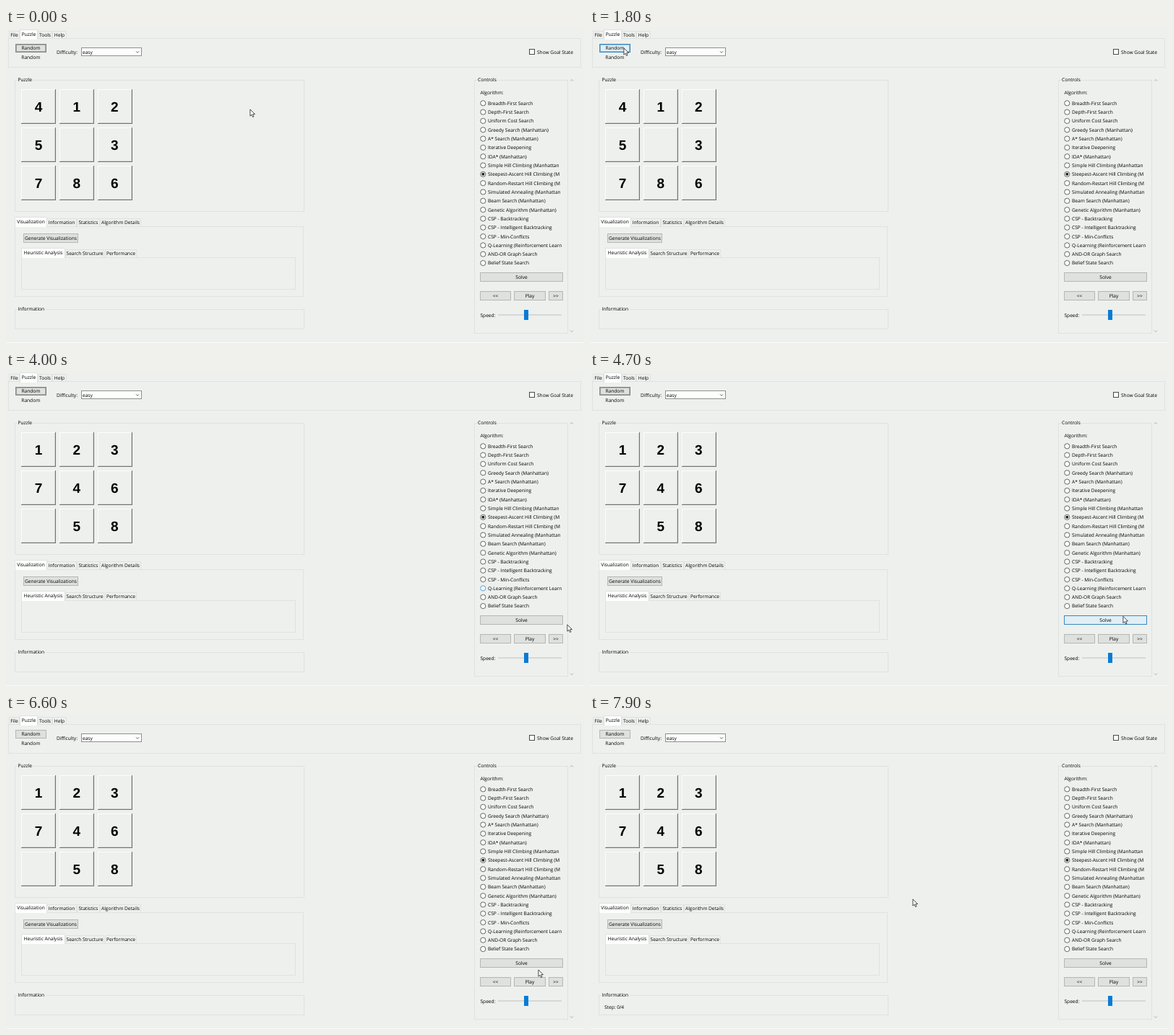
These frames come from a looping animation (800 by 437 pixels, 8000 ms). An HTML page with a canvas:

```html
<!DOCTYPE html>
<html lang="en">
<head>
<meta charset="utf-8">
<title>Sliding puzzle solver</title>
<style>
html, body { margin: 0; width: 800px; height: 437px; overflow: hidden; background: #edf0ed; }
canvas { display: block; }
</style>
</head>
<body>
<canvas id="stage" width="800" height="437"></canvas>
<script>
const ctx = document.getElementById('stage').getContext('2d');
const LOOP = 8000, STEP = 100;
const BG = '#edf0ed', LINE = '#dfe2df';
const UI = '500 6.6px "Open Sans", "Noto Sans", sans-serif';

// long labels are cut off by the panel edge
const ALGORITHMS = [
  'Breadth-First Search', 'Depth-First Search', 'Uniform Cost Search',
  'Greedy Search (Manhattan)', 'A* Search (Manhattan)', 'Iterative Deepening',
  'IDA* (Manhattan)', 'Simple Hill Climbing (Manhattan',
  'Steepest-Ascent Hill Climbing (M', 'Random-Restart Hill Climbing (M',
  'Simulated Annealing (Manhattan', 'Beam Search (Manhattan)',
  'Genetic Algorithm (Manhattan)', 'CSP - Backtracking',
  'CSP - Intelligent Backtracking', 'CSP - Min-Conflicts',
  'Q-Learning (Reinforcement Learn', 'AND-OR Graph Search', 'Belief State Search'
];
const CHOSEN = 8, Q_LEARNING = 16;

// time, x, y of the pointer tip
const PATH = [
  [0, 338, 113], [200, 338, 113], [1000, 45, 36], [1200, 45, 36], [1600, 47, 28],
  [3100, 47, 28], [3700, 660, 301], [4000, 777, 352], [4500, 738, 341], [5000, 738, 339.5],
  [5800, 738, 339.5], [6600, 737, 355], [6800, 735, 370], [7100, 735, 370],
  [7800, 447, 257], [8000, 447, 257]
];

function pointerAt(t) {
  let i = 0;
  while (i < PATH.length - 2 && t >= PATH[i + 1][0]) i++;
  const [t0, x0, y0] = PATH[i], [t1, x1, y1] = PATH[i + 1];
  const u = (t - t0) / (t1 - t0), k = u * u * (3 - 2 * u);
  return { x: x0 + (x1 - x0) * k, y: y0 + (y1 - y0) * k };
}

const boardAt = t => t < 1900 ? '4125 3786' : t < 3000 ? '1234 5786' : '123746 58';

function rect(x, y, w, h, color) {
  ctx.fillStyle = color;
  ctx.fillRect(x, y, w, h);
}

function frame(x, y, w, h, color = LINE) {
  ctx.strokeStyle = color;
  ctx.lineWidth = 1;
  ctx.strokeRect(x + 0.5, y + 0.5, w - 1, h - 1);
}

function text(str, x, y, align = 'left') {
  ctx.font = UI;
  ctx.textAlign = align;
  ctx.textBaseline = 'alphabetic';
  ctx.fillStyle = '#000';
  ctx.fillText(str, x, y + 2.4);
}

function group(title, x, y, w, h, titleX) {
  frame(x, y, w, h);
  ctx.font = UI;
  rect(titleX - 1, y - 3, ctx.measureText(title).width + 2, 7, BG);
  text(title, titleX, y);
}

function tab(label, x, y, w, active) {
  const top = active ? y - 2 : y;
  const h = active ? 14 : 11;
  if (active) rect(x, top, w, h, '#fdfefd');
  ctx.strokeStyle = LINE;
  ctx.lineWidth = 1;
  ctx.beginPath();
  ctx.moveTo(x + 0.5, top + h);
  ctx.lineTo(x + 0.5, top + 0.5);
  ctx.lineTo(x + w - 0.5, top + 0.5);
  ctx.lineTo(x + w - 0.5, top + h);
  ctx.stroke();
  text(label, x + w / 2, active ? y + 4.2 : y + 5.2, 'center');
}

function button(label, x, y, w, h, { hover, focus } = {}) {
  rect(x, y, w, h, hover ? '#e1eef6' : '#dee1de');
  frame(x, y, w, h, hover ? '#3a87bd' : focus ? '#858885' : '#b4b7b4');
  if (focus) frame(x + 1, y + 1, w - 2, h - 2, hover ? '#8fbbd9' : '#a4a7a4');
  text(label, x + w / 2, y + h / 2, 'center');
}

function chevron(x, y, dir, color, r = 2) {
  ctx.strokeStyle = color;
  ctx.lineWidth = 0.9;
  ctx.beginPath();
  ctx.moveTo(x - r, y - dir * r / 2);
  ctx.lineTo(x, y + dir * r / 2);
  ctx.lineTo(x + r, y - dir * r / 2);
  ctx.stroke();
}

function radio(x, y, on, hover) {
  ctx.beginPath();
  ctx.arc(x, y, 3.6, 0, 7);
  ctx.fillStyle = '#fafcfa';
  ctx.fill();
  ctx.strokeStyle = hover ? '#2f8fd0' : '#444';
  ctx.lineWidth = 0.8;
  ctx.stroke();
  if (!on) return;
  ctx.beginPath();
  ctx.arc(x, y, 2, 0, 7);
  ctx.fillStyle = '#222';
  ctx.fill();
}

function tile(col, row, digit) {
  const x = Math.round(21.3 + 52.7 * col), y = Math.round(85.4 + 52.7 * row);
  rect(x, y, 48, 48, '#fcfdfc');
  rect(x + 1, y + 1, 47, 47, '#d2d5d2');
  rect(x + 1, y + 1, 45, 45, BG);
  rect(x + 47, y, 1, 48, '#707370');
  rect(x, y + 47, 48, 1, '#707370');
  ctx.font = 'bold 19px "Liberation Sans", Arial, sans-serif';
  ctx.textAlign = 'center';
  ctx.fillStyle = '#000';
  ctx.fillText(digit, 45 + 52.7 * col, 116.3 + 52.7 * row);
}

function pointer({ x, y }) {
  ctx.save();
  ctx.translate(x - 0.5, y - 0.5);
  ctx.beginPath();
  ctx.moveTo(0.4, 0.4);
  for (const [px, py] of [[0.4, 9.6], [2.5, 7.7], [4, 11], [5.5, 10.3], [4.1, 7.1], [7, 7]]) ctx.lineTo(px, py);
  ctx.closePath();
  ctx.fillStyle = '#fff';
  ctx.fill();
  ctx.strokeStyle = '#222';
  ctx.lineWidth = 0.8;
  ctx.stroke();
  ctx.restore();
}

function toolbar(t, over) {
  frame(3, 14, 793, 41);
  tab('File', 4, 4, 15);
  tab('Tools', 44, 4, 20);
  tab('Help', 64, 4, 20);
  tab('Puzzle', 19, 4, 25, true);
  button('Random', 13, 22, 43, 12, { hover: over(13, 22, 43, 12), focus: t < 5000 });
  text('Random', 34.3, 41, 'center');
  text('Difficulty:', 70, 33.3);
  rect(104, 27, 84, 12, '#fcfdfc');
  frame(104, 27, 84, 12, '#8d908d');
  text('easy', 106, 33.3);
  chevron(182, 33.3, 1, '#555');
  rect(724, 29, 8, 8, '#fcfdfc');
  frame(724, 29, 8, 8, '#4a4a4a');
  text('Show Goal State', 735, 33.3);
}

function leftSide(t) {
  group('Puzzle', 12, 72, 401, 183, 16.5);
  [...boardAt(t)].forEach((d, i) => tile(i % 3, Math.floor(i / 3), d.trim()));

  frame(12, 275, 400, 98);
  tab('Information', 56, 264, 42);
  tab('Statistics', 98, 264, 32);
  tab('Algorithm Details', 130, 264, 57);
  tab('Visualization', 12, 264, 45, true);
  button('Generate Visualizations', 24, 285, 76, 13);
  frame(21, 318, 380, 45);
  tab('Search Structure', 82, 307, 54);
  tab('Performance', 137, 307, 44);
  tab('Heuristic Analysis', 21, 307, 61, true);

  group('Information', 12, 390, 401, 28, 16.5);
  if (t >= 7000) text('Step: 0/4', 20, 407);
}

function controls(t, over) {
  group('Controls', 648, 72, 130, 352, 653);
  text('Algorithm:', 656.5, 90);
  ctx.save();
  ctx.beginPath();
  ctx.rect(650, 80, 120.5, 260);
  ctx.clip();
  ALGORITHMS.forEach((name, i) => {
    const y = 104.3 + 12.32 * i;
    radio(660.3, y, i === CHOSEN, i === Q_LEARNING && t >= 3700 && t < 4200);
    text(name, 667, y);
  });
  ctx.restore();

  button('Solve', 656, 339, 115, 13, { hover: t < 5000 && over(656, 339, 115, 13) });
  button('<<', 656, 365, 43, 13);
  button('Play', 703, 365, 44, 13, { hover: over(703, 365, 44, 13) });
  button('>>', 751, 365, 20, 13);
  text('Speed:', 656.5, 398.3);
  rect(681, 397, 88, 2, '#d5d8d5');
  rect(717, 391, 6, 14, '#0a7bd6');
  chevron(783, 72.5, -1, '#a3a6a3');
  chevron(783, 420.5, 1, '#a3a6a3');
}

function draw(t) {
  const tip = pointerAt(t);
  const over = (x, y, w, h) => tip.x >= x && tip.x < x + w && tip.y >= y && tip.y < y + h;
  ctx.textRendering = 'geometricPrecision';
  rect(0, 0, 800, 437, BG);
  rect(0, 436, 800, 1, '#fafbfa');
  toolbar(t, over);
  leftSide(t);
  controls(t, over);
  pointer(tip);
}

const start = performance.now();
function tick() {
  const t = (performance.now() - start) % LOOP;
  draw(Math.floor(t / STEP) * STEP);
  requestAnimationFrame(tick);
}
tick();
</script>
</body>
</html>
```
